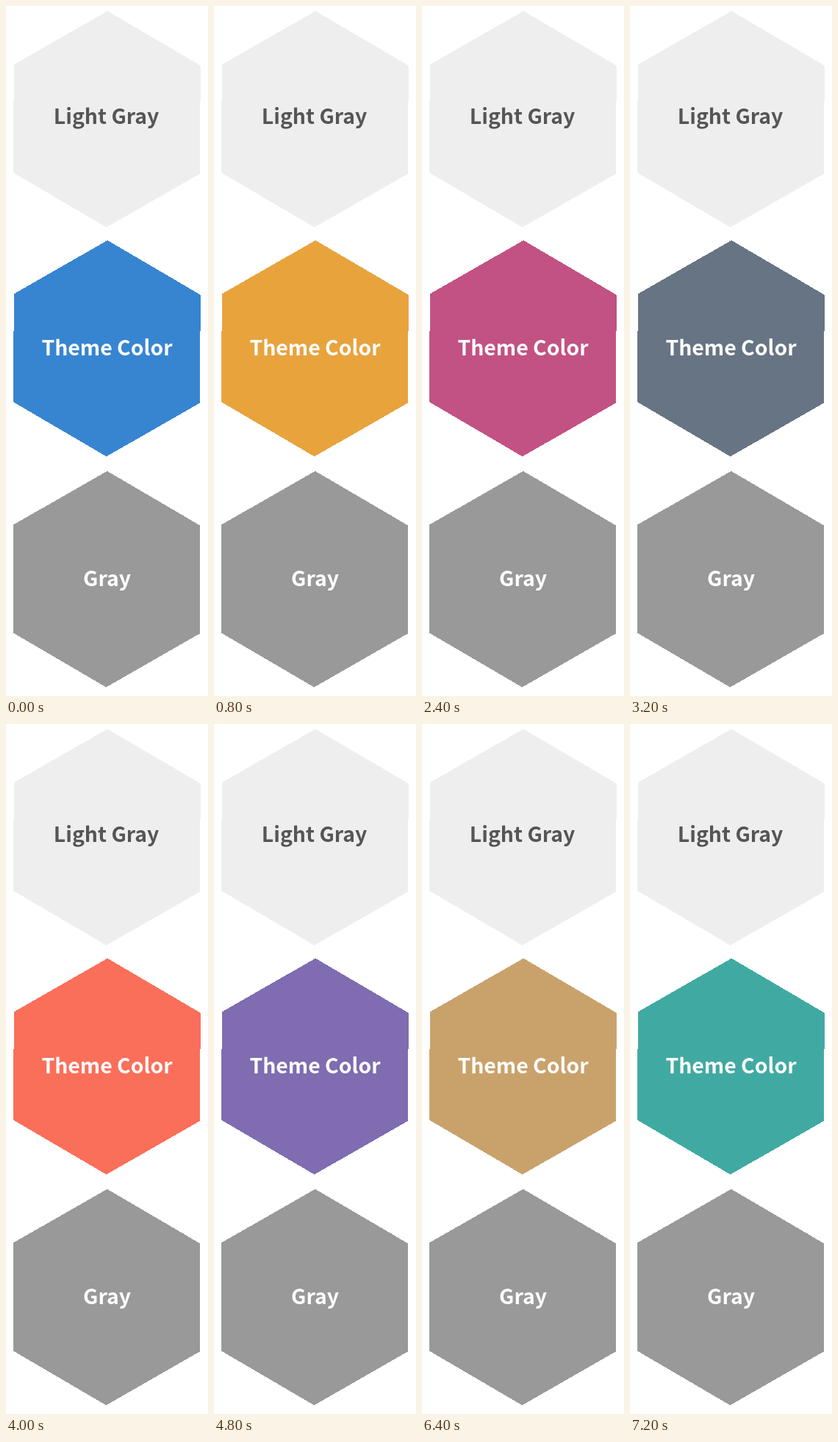
Animation, 275 px wide and 936 px high, one loop 8000 ms. Source, as an HTML page:

```html
<!DOCTYPE html>
<html lang="en">
<head>
<meta charset="utf-8">
<title>Theme colors</title>
<style>
  html, body { margin: 0; width: 100%; height: 100%; overflow: hidden; background: #fff; }
  svg { display: block; }
  use { shape-rendering: crispEdges; }
  text {
    font: 700 28.4px "Noto Sans CJK JP", "Noto Sans CJK SC", "Noto Sans CJK", sans-serif;
    text-anchor: middle;
    fill: #fff;
  }
</style>
</head>
<body>
<svg width="275" height="936" viewBox="0 0 275 936">
  <defs>
    <!-- Regular hexagon, turned slightly clockwise -->
    <polygon id="hexagon" transform="rotate(.29)"
      points="0,-146.6 127,-73.3 127,73.3 0,146.6 -127,73.3 -127,-73.3"/>
  </defs>
  <use href="#hexagon" x="137.4" y="153.5" fill="#eee"/>
  <use href="#hexagon" x="137.4" y="464.5" id="theme"/>
  <use href="#hexagon" x="137" y="777.5" fill="#999"/>
  <text x="136.6" y="160" style="fill:#555">Light Gray</text>
  <text x="137.5" y="474">Theme Color</text>
  <text x="137.5" y="787">Gray</text>
</svg>
<script>
  const STEP = 800;
  const colors = [
    '#3785d0', '#e8a33d', '#79d38b', '#c25283', '#677483',
    '#fa6f5a', '#7f6cb1', '#dc5048', '#c9a26b', '#40aaa2'
  ];
  const theme = document.getElementById('theme');

  function draw() {
    const step = Math.floor(performance.now() / STEP) % colors.length;
    theme.setAttribute('fill', colors[step]);
    requestAnimationFrame(draw);
  }
  draw();
</script>
</body>
</html>
```
